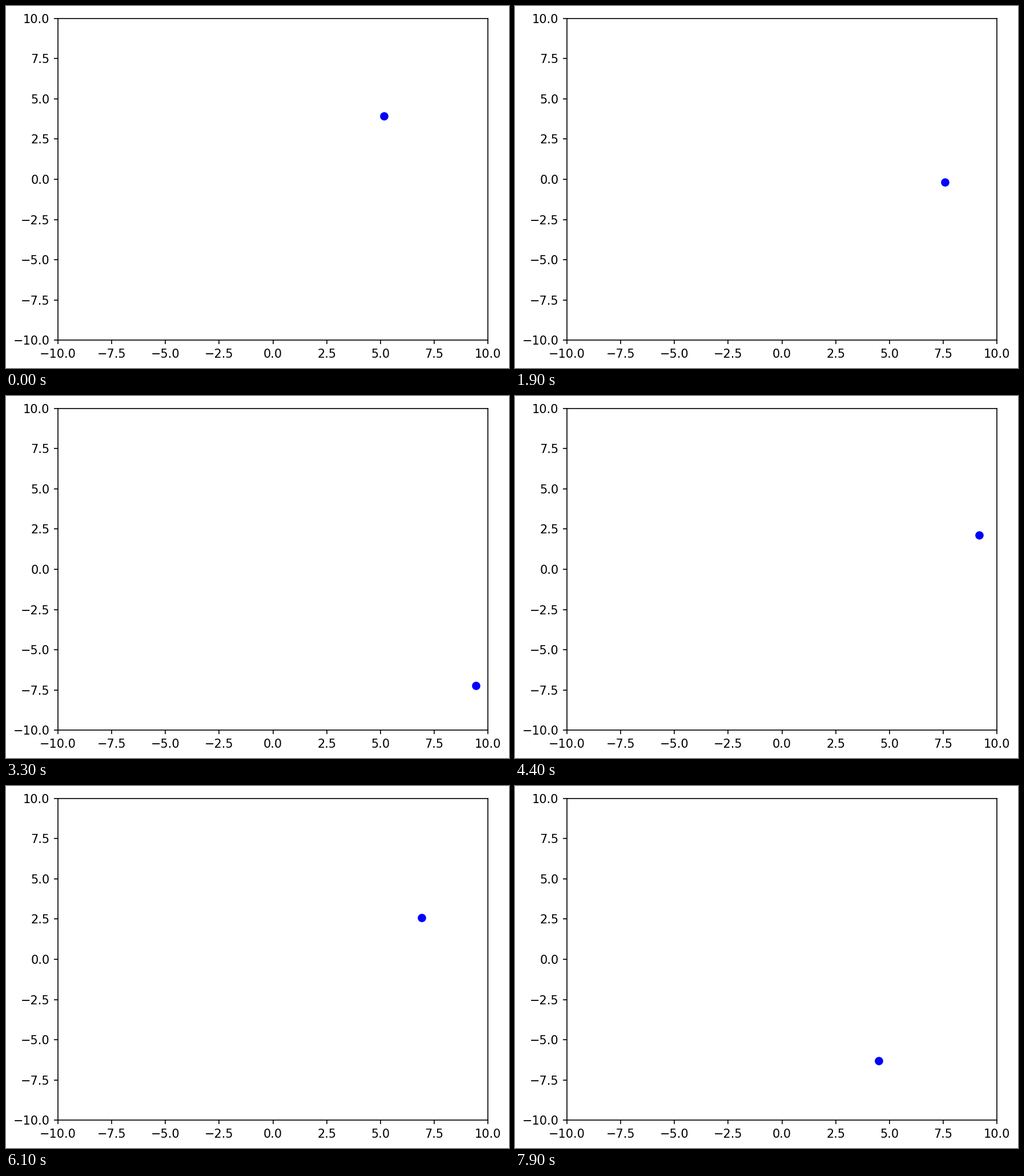
A matplotlib script that plays this animation: 881x635 px, repeating every 8 s.

```python
import matplotlib.pyplot as plt
from matplotlib.animation import FuncAnimation

W, H, DPI = 881, 635, 150
LEFT, RIGHT, TOP, BOTTOM = 91, 844, 21.7, 586.2
LIMIT = 10
FRAMES = 80


def bounce(pos, vel):
    """Advance one step, stopping at the wall when one is reached."""
    part = 1.0
    hit = None
    for k in (0, 1):
        wall = LIMIT if vel[k] > 0 else -LIMIT
        reach = (wall - pos[k]) / vel[k]
        if reach < part:
            part, hit = reach, k
    pos = [p + v * part for p, v in zip(pos, vel)]
    if hit is not None:
        vel = [-v if k == hit else v for k, v in enumerate(vel)]
    return pos, vel


def make_path():
    pos, vel = [5.166, 3.92], [0.1372, 0.9263]
    path = [pos, pos]
    while len(path) < FRAMES:
        pos, vel = bounce(pos, vel)
        path.append(pos)
    return path


path = make_path()

fig = plt.figure(figsize=((W + 0.001) / DPI, (H + 0.001) / DPI), dpi=DPI)
ax = fig.add_axes([LEFT / W, 1 - BOTTOM / H,
                   (RIGHT - LEFT) / W, (BOTTOM - TOP) / H])
ax.set_xlim(-LIMIT, LIMIT)
ax.set_ylim(-LIMIT, LIMIT)
ball, = ax.plot([], [], "bo")


def update(i):
    x, y = path[i]
    ball.set_data([x], [y])
    return ball,


anim = FuncAnimation(fig, update, frames=FRAMES, interval=100, repeat=True)
plt.show()
```
